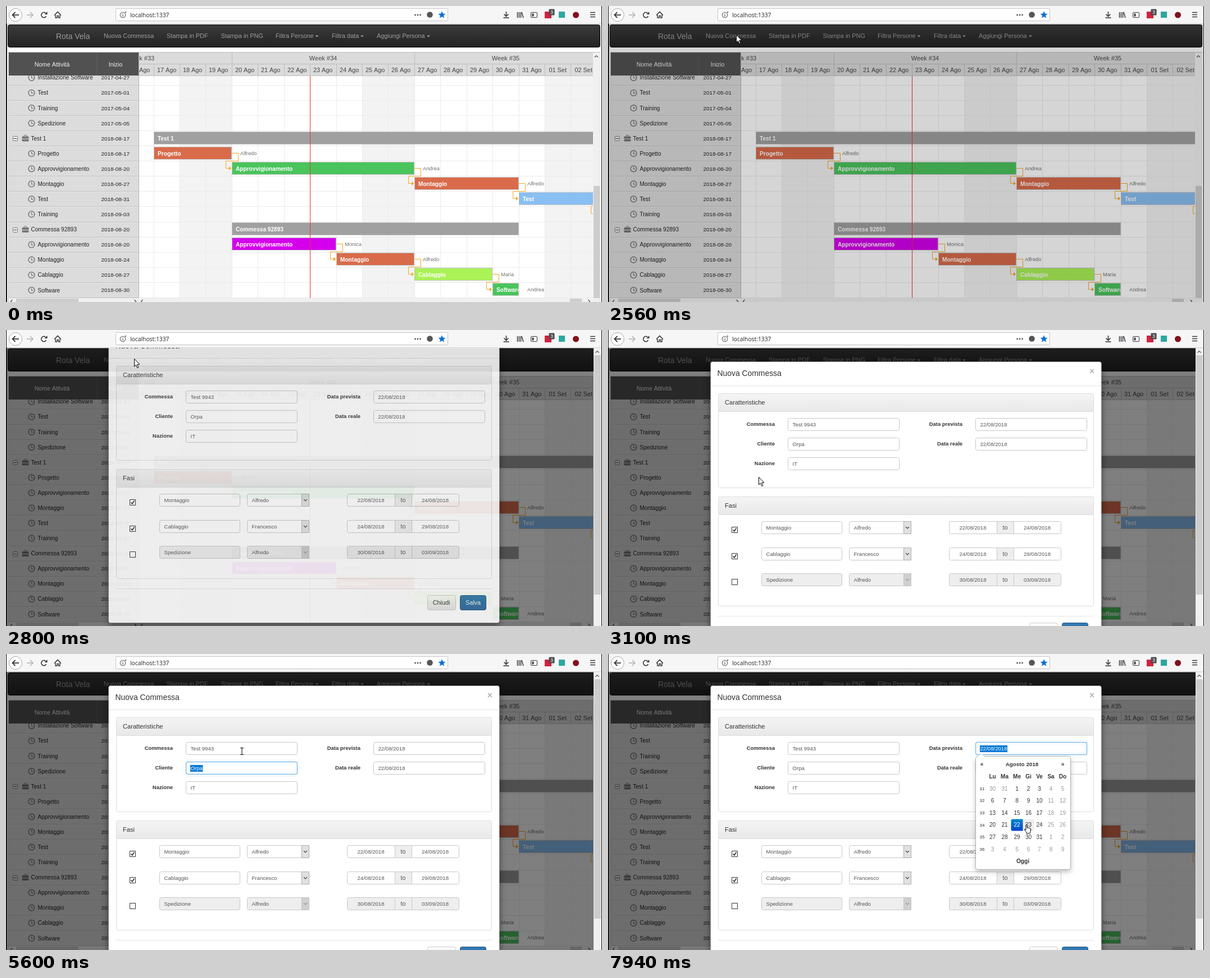
Animation of 1061x528 px, one loop 8000 ms. Source, as an HTML page with a canvas:

```html
<!DOCTYPE html>
<html lang="it">
<head>
<meta charset="utf-8">
<title>Gantt</title>
<style>
html, body { margin: 0; width: 100%; height: 100%; overflow: hidden; background: #fff; }
canvas { display: block; }
</style>
</head>
<body>
<canvas id="stage" width="1061" height="528"></canvas>
<script>
const W = 1061, H = 528, LOOP = 8000;
const SANS = '"Liberation Sans", Arial, sans-serif';
const stage = document.getElementById('stage').getContext('2d');
let c = stage;

// ---------- drawing helpers ----------
function rect(x, y, w, h, fill) { c.fillStyle = fill; c.fillRect(x, y, w, h); }

function box(x, y, w, h, r, fill, stroke) {
  c.beginPath();
  c.roundRect(x + .5, y + .5, w - 1, h - 1, r);
  if (fill) { c.fillStyle = fill; c.fill(); }
  if (stroke) { c.strokeStyle = stroke; c.lineWidth = 1; c.stroke(); }
}

function line(points, color, width = 1) {
  c.beginPath();
  points.forEach(([x, y], i) => i ? c.lineTo(x, y) : c.moveTo(x, y));
  c.strokeStyle = color; c.lineWidth = width; c.stroke();
}

function poly(points, fill, stroke) {
  c.beginPath();
  points.forEach(([x, y]) => c.lineTo(x, y));
  c.closePath();
  if (fill) { c.fillStyle = fill; c.fill(); }
  if (stroke) { c.strokeStyle = stroke; c.lineWidth = 1; c.stroke(); }
}

function circle(x, y, r, fill, stroke, width = 1) {
  c.beginPath(); c.arc(x, y, r, 0, 7);
  if (fill) { c.fillStyle = fill; c.fill(); }
  if (stroke) { c.strokeStyle = stroke; c.lineWidth = width; c.stroke(); }
}

// y is the middle of the text line
function text(s, x, y, size, color, { align = 'left', bold = false, font = SANS } = {}) {
  c.font = `${bold ? 'bold ' : ''}${size}px ${font}`;
  c.textAlign = align; c.fillStyle = color;
  c.fillText(s, x, Math.round(y + size * .36));
}

function fade(y, h, top, bottom) {
  const g = c.createLinearGradient(0, y, 0, y + h);
  g.addColorStop(0, top); g.addColorStop(1, bottom);
  return g;
}

function clipped(x, y, w, h, draw) {
  c.save(); c.beginPath(); c.rect(x, y, w, h); c.clip(); draw(); c.restore();
}

function layer(draw, height = H) {
  const canvas = document.createElement('canvas');
  canvas.width = W; canvas.height = height;
  c = canvas.getContext('2d');
  draw();
  c = stage;
  return canvas;
}

// dx, dy: direction the chevron points to
function chevron(x, y, dx, dy, color = '#505050', r = 3) {
  const bx = x - dx * r / 2, by = y - dy * r / 2;
  line([[bx - dy * r, by - dx * r], [x + dx * r / 2, y + dy * r / 2], [bx + dy * r, by + dx * r]], color, 1.2);
}

// ---------- browser bar ----------
function drawBrowser() {
  const ink = '#38383d';
  rect(0, 0, W, 32, '#f6f6f7');
  rect(0, 31, W, 1, '#d0d0d2');
  circle(17, 16, 11.5, '#fff', '#a8a8aa');
  line([[23, 16], [12, 16]], ink, 1.8); line([[16.5, 11], [11.5, 16], [16.5, 21]], ink, 1.8);
  line([[37, 16], [48, 16]], '#b5b5b7', 1.6); line([[43, 11], [48, 16], [43, 21]], '#b5b5b7', 1.6);
  c.beginPath(); c.arc(67.5, 16, 4.6, .5, 5.4); c.strokeStyle = ink; c.lineWidth = 1.7; c.stroke();
  poly([[73.5, 10], [73.5, 15], [68.5, 15]], ink);
  line([[86, 16.5], [92, 10.5], [98, 16.5]], ink, 1.7);
  line([[88, 16], [88, 21], [91, 21], [91, 17.5], [93.5, 17.5], [93.5, 21], [96, 21], [96, 16]], ink, 1.4);

  box(195, 4, 592, 23, 1, '#fff', '#c4c4c6');
  circle(208, 16, 4.8, null, '#606064', 1.1);
  rect(207.5, 15, 1.2, 4, '#606064'); rect(207.5, 13, 1.2, 1.2, '#606064');
  rect(212, 10, 2, 2, '#606064');
  text('localhost:1337', 221, 16, 10.3, '#222', { font: '"Open Sans", sans-serif' });
  [728.5, 733, 737.5].forEach(x => circle(x, 16, 1.4, '#55555a'));
  circle(754.5, 15.5, 5.3, '#55555a');
  poly(Array.from({ length: 10 }, (_, i) => {
    const r = i % 2 ? 3.1 : 6.8, a = i * Math.PI / 5 - Math.PI / 2;
    return [776 + r * Math.cos(a), 16 + r * Math.sin(a)];
  }), '#0a6fd8');

  line([[890.5, 10], [890.5, 18]], ink, 1.6); line([[886.5, 14.5], [890.5, 18.5], [894.5, 14.5]], ink, 1.6);
  line([[885.5, 21], [895.5, 21]], ink, 1.6);
  [910.5, 913.5, 916.5].forEach(x => line([[x, 11], [x, 21]], ink, 1.5));
  line([[918, 11], [921, 21]], ink, 1.5);
  box(934, 11, 12, 10, 1.5, null, ink); box(936, 13, 4, 6, 0, ink);
  rect(959, 10, 12, 12, '#d4213d');
  box(966, 5, 11, 12, 1, '#4b4b50');
  text('3', 971.5, 11, 9, '#fff', { align: 'center' });
  rect(984, 10, 11, 11, '#2aa8a0');
  circle(1014.5, 16, 5.5, '#80101a');
  [11.5, 15.5, 19.5].forEach(y => line([[1040, y], [1049, y]], ink, 1.5));
}

// ---------- gantt page ----------
const DAY = 46.43, DAY0 = 262.5, ROW = 27.08;
const rowY = i => 127.8 + ROW * i;
const dayX = d => Math.round(DAY0 + DAY * d);
const ORANGE = '#d96b4a', GREEN = '#4ac45c', GRAY = '#a0a0a0';

const tasks = [
  ['Installazione Software', '2017-04-27'], ['Test', '2017-05-01'], ['Training', '2017-05-04'],
  ['Spedizione', '2017-05-05'], ['Test 1', '2018-08-17', 1], ['Progetto', '2018-08-17'],
  ['Approvvigionamento', '2018-08-20'], ['Montaggio', '2018-08-27'], ['Test', '2018-08-31'],
  ['Training', '2018-09-03'], ['Commessa 92893', '2018-08-20', 1], ['Approvvigionamento', '2018-08-20'],
  ['Montaggio', '2018-08-24'], ['Cablaggio', '2018-08-27'], ['Software', '2018-08-30']
];
// row, first day, last day, colour, person
const bars = [
  [4, 0, 20, GRAY], [5, 0, 3, ORANGE, 'Alfredo'], [6, 3, 10, GREEN, 'Andrea'],
  [7, 10, 14, ORANGE, 'Alfredo'], [8, 14, 17, '#89bff3', ''], [10, 3, 14, GRAY],
  [11, 3, 7, '#d400ec', 'Monica'], [12, 7, 10, ORANGE, 'Alfredo'],
  [13, 10, 13, '#aaf256', 'Maria'], [14, 13, 14, GREEN, 'Andrea']
];

function drawNavbar() {
  box(3, 33, 1055, 41, 3, fade(33, 41, '#3c3c3c', '#222'), '#0c0c0c');
  text('Rota Vela', 89, 54, 13.95, '#9d9d9d');
  [['Nuova Commessa', 174], ['Stampa in PDF', 286], ['Stampa in PNG', 382.5],
   ['Filtra Persone', 480, 553.5], ['Filtra data', 580, 634], ['Aggiungi Persona', 660, 752]]
    .forEach(([label, x, caret]) => {
      text(label, x, 53.5, 10.85, '#9d9d9d');
      if (caret) poly([[caret - 3, 52.5], [caret + 3, 52.5], [caret, 55.5]], '#9d9d9d');
    });
}

function drawTaskList() {
  rect(5, 124, 231, 397, '#dcdcdc');
  clipped(5, 124, 231, 397, () => tasks.forEach(([name, date, group], i) => {
    const y = rowY(i), edge = Math.round(y + 13);
    rect(5, edge, 231, 1, '#c3c3c3'); rect(5, edge + 1, 231, 1, '#e6e6e6');
    if (group) {
      box(12, Math.round(y) - 4, 9, 9, 1, '#eee', '#777');
      rect(14, Math.round(y), 5, 1, '#333');
      box(28, y - 4, 13, 10, 1.5, '#767676');
      box(31.5, y - 6, 6, 4, 1, null, '#767676');
      rect(28, y + .5, 13, 1, '#dcdcdc');
    } else {
      circle(45.5, y, 5.4, null, '#777', 1.5);
      line([[45.5, y - 3.5], [45.5, y + .5], [48.5, y + .5]], '#777', 1.2);
    }
    text(name, group ? 44.5 : 56.5, y, 10.05, '#222');
    text(date, 169.5, y, 9.9, '#222');
  }));
  rect(5, 83, 231, 41, '#515151');
  rect(161, 83, 1, 41, '#5d5d5d');
  text('Nome Attività', 82, 104, 10.55, '#f0f0f0', { align: 'center' });
  text('Inizio', 195, 104, 10.5, '#f0f0f0', { align: 'center' });
}

function drawChart() {
  for (let d = 1; d < 17; d += 7) rect(dayX(d), 124, dayX(d + 2) - dayX(d), 397, '#f3f3f3');
  for (let d = 0; d < 17; d++) rect(dayX(d), 124, 1, 397, '#ebebeb');
  tasks.forEach((_, i) => rect(237, Math.round(rowY(i) + 13), 808, 1, '#ebebeb'));

  rect(237, 83, 808, 41, '#dbdbdb');
  rect(237, 103, 808, 1, '#bdbdbd'); rect(237, 124, 808, 1, '#c4c4c4');
  for (let d = -1; d < 17; d++) {
    const x = dayX(d), n = 17 + d, top = d % 7 === 3 ? 83 : 103;
    rect(x, top, 1, 124 - top, '#bdbdbd');
    const label = n > 31 ? `0${n - 31} Set` : `${n} Ago`;
    text(label, x + DAY / 2, 114.5, 10.85, '#444', { align: 'center' });
  }
  [33, 34, 35].forEach((w, i) => text('Week #' + w, 239.5 + 325 * i, 93, 11, '#444', { align: 'center' }));

  bars.forEach(([row, from, to, color, person]) => {
    const x = dayX(from), end = dayX(to), y = Math.floor(rowY(row)), top = y - 12;
    if (person !== undefined && row !== 14) {
      const mid = y + 13.5, next = y + 27;
      line([[end, y - .5], [end + 11.5, y - .5], [end + 11.5, mid], [end - 10.5, mid],
        [end - 10.5, next - .5], [end - 4, next - .5]], '#f5a524');
      poly([[end - 5, next - 4], [end - 5, next + 3], [end - 1, next - .5]], '#f5a524');
    }
    rect(x, top, end - x, 23, 'rgba(150,150,150,.55)');
    rect(x + 1, top + 1, end - x - 2, 21, color);
    clipped(x, top, end - x - 1, 23, () => text(tasks[row][0], x + 7, y, 10.15, '#fff', { bold: true }));
    if (person) text(person, end + 15, y, 9.25, '#707070');
  });
  rect(541, 125, 1, 396, '#e5352c');
}

function drawPage() {
  rect(0, 0, W, H, '#fff');
  drawNavbar();
  box(4, 82, 1054, 460, 0, '#fff', '#c0c0c0');
  drawTaskList();
  clipped(237, 83, 808, 438, drawChart);
  rect(236, 83, 1, 445, '#b5b5b5');
  rect(1045, 83, 13, 445, '#f0f0f0');
  rect(1046, 321, 11, 200, '#cdcdcd');
  chevron(1051, 90, 0, -1); chevron(1051, 526, 0, 1);
  rect(5, 521, 1053, 7, '#f0f0f0');
  rect(18, 522, 111, 6, '#cdcdcd'); rect(1004, 522, 21, 6, '#cdcdcd');
  chevron(10, 527, -1, 0); chevron(230, 527, 1, 0);
  chevron(242, 527, -1, 0); chevron(1038, 527, 1, 0);
}

// ---------- dialog ----------
const INK = '#555';
const fields = [
  ['Commessa', 'Test 9943', 320, 157], ['Cliente', 'Orpa', 320, 192], ['Nazione', 'IT', 320, 227],
  ['Data prevista', '22/08/2018', 654, 157], ['Data reale', '22/08/2018', 654, 192]
];

function panel(title, y, h) {
  box(196, y, 669, h, 3, '#fff', '#dcdcdc');
  box(196, y, 669, 33, 3, fade(y, 33, '#f5f5f5', '#e8e8e8'), '#dcdcdc');
  text(title, 208, y + 16.5, 11.1, '#333');
}

function input(x, y, w, value, off) {
  box(x, y, w, 23, 3, off ? '#eee' : '#fff', '#c8c8c8');
  text(value, x + 8.5, y + 11.5, 9.6, INK);
}

function phase(y, name, person, from, to, on) {
  box(220, y + 10, 11, 11, 0, '#fff', '#333');
  if (on) line([[222.5, y + 15.5], [224.7, y + 18], [228.5, y + 12.5]], '#222', 1.4);
  input(273, y, 144, name, !on);
  input(429, y, 111, person, !on);
  box(526, y, 14, 23, 0, on ? '#e1e1e1' : '#cfcfcf', on ? '#adadad' : '#c4c4c4');
  chevron(533, y + 11.5, 0, 1, on ? '#444' : '#999');
  input(607, y, 88, '', !on); input(718, y, 89, '', !on);
  text(from, 649.5, y + 11.5, 9.6, INK, { align: 'center' });
  text(to, 764, y + 11.5, 9.6, INK, { align: 'center' });
  box(692, y, 31, 23, 0, '#eee', '#c8c8c8');
  text('to', 707, y + 11.5, 10.85, INK, { align: 'center' });
}

function drawDialog() {
  c.shadowColor = 'rgba(0,0,0,.5)'; c.shadowBlur = 12; c.shadowOffsetY = 4;
  box(182, 56, 697, 516, 4, '#fff');
  c.shadowColor = 'transparent';
  box(182, 56, 697, 516, 4, null, 'rgba(0,0,0,.2)');
  text('Nuova Commessa', 194.5, 77, 13.9, '#333');
  text('×', 861.5, 73, 16, '#b5b5b5', { align: 'center', bold: true });
  rect(183, 99, 695, 1, '#e5e5e5');
  panel('Caratteristiche', 113, 169);
  fields.forEach(([label, value, x, y]) => {
    text(label, x - 23, y + 11, 9.45, '#333', { align: 'right', bold: true });
    input(x, y, 199, value);
  });
  panel('Fasi', 297, 196);
  phase(341, 'Montaggio', 'Alfredo', '22/08/2018', '24/08/2018', true);
  phase(388, 'Cablaggio', 'Francesco', '24/08/2018', '29/08/2018', true);
  phase(434, 'Spedizione', 'Alfredo', '30/08/2018', '03/09/2018', false);
  rect(196, 510, 669, 1, '#e5e5e5');
  box(750, 522, 51, 27, 3, fade(522, 27, '#fff', '#e0e0e0'), '#ccc');
  text('Chiudi', 775, 535.5, 10.85, '#333', { align: 'center' });
  box(808, 522, 47, 27, 3, fade(522, 27, '#337ab7', '#2a6496'), '#245580');
  text('Salva', 831.5, 535.5, 10.85, '#fff', { align: 'center' });
}

function drawDialogScrollbar() {
  rect(1046, 32, 14, 496, '#f0f0f0');
  rect(1047, 45, 12, 427, '#cdcdcd');
  chevron(1052.5, 39, 0, -1);
}

// ---------- date picker ----------
const weekdays = ['Lu', 'Ma', 'Me', 'Gi', 'Ve', 'Sa', 'Do'];
const colX = [684.5, 706, 728, 748.5, 768, 788.5, 809.5];

function drawPicker(pointer) {
  const bold = { align: 'center', bold: true }, mid = { align: 'center' };
  c.shadowColor = 'rgba(0,0,0,.25)'; c.shadowBlur = 9; c.shadowOffsetY = 4;
  box(654, 182, 170, 203, 4, '#fff');
  c.shadowColor = 'transparent'; c.shadowOffsetY = 0;
  box(654, 182, 170, 203, 4, null, 'rgba(0,0,0,.25)');
  poly([[659.5, 183], [664.5, 178], [669.5, 183]], '#fff');
  text('«', 665.5, 196.5, 10, '#333', bold);
  text('Agosto 2018', 737, 196.5, 9.9, '#333', bold);
  text('»', 809.5, 196.5, 10, '#333', bold);
  weekdays.forEach((d, i) => text(d, colX[i], 218, 10, '#333', bold));
  for (let row = 0; row < 6; row++) {
    const y = 240 + 21.6 * row;
    text(31 + row, 666, y, 8, '#333', mid);
    colX.forEach((x, col) => {
      const n = row * 7 + col - 1, inMonth = n > 0 && n < 32;
      const day = n < 1 ? n + 31 : n > 31 ? n - 31 : n;
      const hover = pointer && col < 5 && Math.abs(pointer.x - x) < 10.5 && Math.abs(pointer.y - y) < 10.8;
      if (n === 22) box(717, 294, 23, 22, 3, fade(294, 22, '#08c', '#04c'));
      else if (hover) box(x - 10.5, y - 10.8, 21, 22, 3, '#eee');
      text(day, x, y, 10.05, n === 22 ? '#fff' : inMonth && col < 5 ? '#333' : '#999', mid);
    });
  }
  text('Oggi', 738.5, 369.5, 10.2, '#333', bold);
}

// ---------- pointer ----------
const pointers = {
  arrow(x, y) {
    poly([[0, 0], [0, 13.5], [3, 10.8], [5.3, 16], [7.4, 15], [5.2, 10], [9.3, 9.7]]
      .map(([a, b]) => [x + a + .5, y + b + .5]), '#fff', '#000');
  },
  beam(x, y) {
    line([[x, y - 5], [x, y + 6]], '#111', 1.1);
    [-5.5, 6.5].forEach(d => line([[x - 3, y + d], [x + 3, y + d]], '#111', 1));
  },
  hand(x, y) {
    poly([[3, 1], [4, 0], [5.2, 1], [5.2, 6], [7, 5.6], [8, 6.5], [9.6, 6.3], [11.5, 7.5], [11.5, 11],
      [10, 16], [4, 16], [3.5, 13.5], [.5, 9.5], [.8, 8.2], [3, 9.6]]
      .map(([a, b]) => [x + a, y + b]), '#fff', '#000');
  }
};
// time, x, y, shape (same as before when left out)
const moves = [
  [0, 0, 0, 'none'], [380, 638, 484, 'arrow'], [450, 582, 467], [680, 450, 420], [760, 312, 370],
  [1080, 285, 300], [1150, 248, 233], [1380, 312, 166], [1460, 0, 0, 'none'],
  [1780, 191, 34, 'arrow'], [1850, 203, 58], [1930, 218, 67], [2010, 226, 62], [2090, 229, 55], [2170, 228, 51],
  [2950, 245, 110], [3020, 262, 200], [3100, 268, 262], [3330, 340, 281], [3410, 400, 240],
  [3500, 420, 194, 'beam'], [3960, 420, 183], [4030, 420, 173],
  [6750, 450, 175], [6830, 474, 187, 'arrow'], [6980, 490, 240], [7050, 512, 300], [7130, 527, 329],
  [7290, 620, 340], [7370, 700, 350, 'hand'], [7450, 769, 351], [7680, 765, 335],
  [7750, 757, 320], [7830, 748, 308], [7940, 741, 304]
];
for (let i = 1; i < moves.length; i++) moves[i][3] ??= moves[i - 1][3];

// ---------- timeline ----------
const steps = [0, 2480, 2560, 2630, 2720, 2800, 2870, 2950, 3020, 3100, 4660, 4740, 4810,
  5520, 5600, 5820, 5890, 5970, 6270, 6360, 6460];
const focusStart = [4620, 5450, 5790, 6260, Infinity];
const clamp = v => Math.max(0, Math.min(1, v));

function drawFocus(t, ui) {
  focusStart.slice(0, 4).forEach((start, i) => {
    const end = focusStart[i + 1];
    const glow = clamp((ui - start) / 150) - clamp((ui - end) / 150);
    const [, value, x, y] = fields[i];
    if (glow > 0) {
      c.save();
      c.globalAlpha = glow;
      c.shadowColor = 'rgba(102,175,233,.7)'; c.shadowBlur = 6;
      box(x, y, 199, 23, 3, null, '#66afe9');
      c.restore();
    }
    if (i && ui >= start && ui < end) {
      c.font = `9.6px ${SANS}`;
      rect(x + 8, y + 6, c.measureText(value).width + 1, 12, '#0078d7');
      text(value, x + 8.5, y + 11.5, 9.6, '#fff');
    }
  });
  if (t >= 4660 && t < 5120) rect(370, 163, 1, 11, '#222');
}

const page = layer(drawPage);
const browser = layer(drawBrowser);
const dialog = layer(drawDialog, 600);

function render(t) {
  const ui = steps.findLast(s => s <= t);
  const [, px, py, shape] = moves.findLast(m => m[0] <= t);

  c.drawImage(page, 0, 0);
  if (t >= 1850 && t < 2480) text('Nuova Commessa', 174, 53.5, 10.85, '#fff');
  rect(1, 32, 1059, 496, `rgba(0,0,0,${.5 * clamp((ui - 2510) / 150)})`);

  if (ui >= 2720) {
    const left = 1 - clamp((ui - 2665) / 300);
    c.globalAlpha = clamp((ui - 2665) / 155);
    c.drawImage(dialog, 0, Math.round(-136 * left ** 1.7));
    c.globalAlpha = 1;
    drawDialogScrollbar();
    drawFocus(t, ui);
    if (ui >= 6360) drawPicker(shape === 'hand' && { x: px + 4, y: py + 1 });
  }

  c.drawImage(browser, 0, 0, W, 32, 0, 0, W, 32);
  rect(0, 0, 1, H, '#111'); rect(1060, 0, 1, H, '#111');
  rect(1, 32, 1, H, '#222');
  pointers[shape]?.(px, py);
}

const began = performance.now();
function tick() {
  render((performance.now() - began) % LOOP);
  requestAnimationFrame(tick);
}
tick();
</script>
</body>
</html>
```
